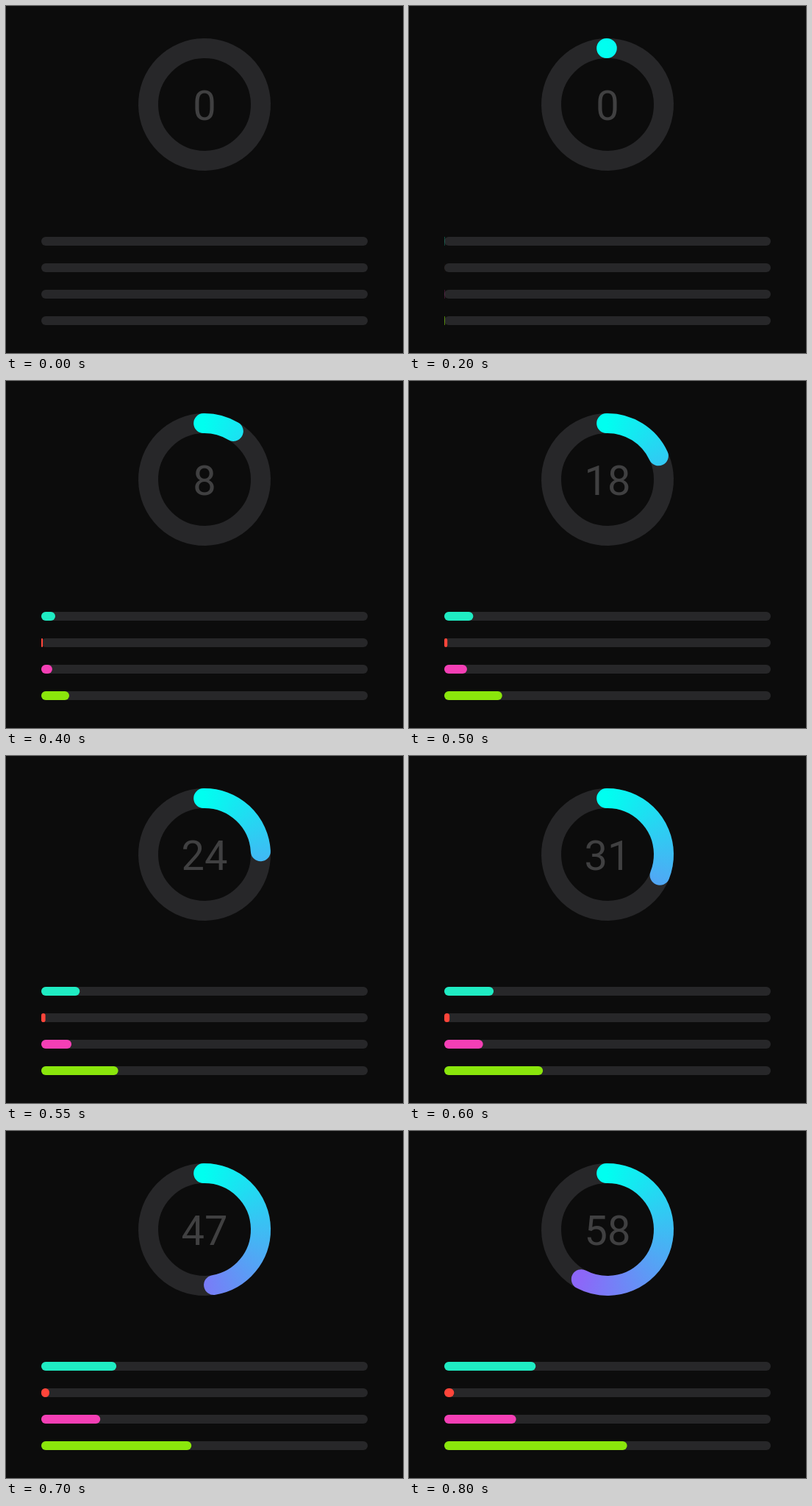
These frames come from a looping animation (540x472 px, 3.8 s). An HTML page with a canvas:

```html
<!DOCTYPE html>
<html lang="en">
<head>
<meta charset="utf-8">
<title>Progress ring and bars</title>
<style>
  html, body { margin: 0; width: 540px; height: 472px; overflow: hidden; background: #0c0c0c; }
  canvas { display: block; }
  #count {
    position: absolute; left: 0; top: 108px; width: 540px;
    font: 400 56px/56px Roboto, sans-serif;
    text-align: center; color: #404041;
  }
</style>
</head>
<body>
<canvas id="stage" width="540" height="472"></canvas>
<div id="count">0</div>
<script>
  const LOOP = 3800, STEP = 50, FIRST = 200;
  const EASE_START = 172.5, EASE_TIME = 582;
  const GOAL = 58;
  const TRACK = '#272729', CYAN = '#00fff0', VIOLET = '#8c67f8';
  const RING = { x: 270, y: 134, r: 76.5, width: 27 };
  const BARS = [
    { y: 314, share: 0.28, color: '#1fecc3' },
    { y: 350, share: 0.03, color: '#ff453a' },
    { y: 386, share: 0.22, color: '#f43fb5' },
    { y: 422, share: 0.56, color: '#8ae60c' }
  ];
  const BAR_X = 48, BAR_W = 444, BAR_H = 12;

  const ctx = document.getElementById('stage').getContext('2d');
  const count = document.getElementById('count');
  const TURN = Math.PI * 2;
  const ringStart = -TURN / 4 - TURN / 360;

  const sweep = ctx.createConicGradient(ringStart, RING.x, RING.y);
  sweep.addColorStop(0, CYAN);
  sweep.addColorStop(GOAL / 100, VIOLET);
  sweep.addColorStop(0.75, VIOLET);
  sweep.addColorStop(0.75, CYAN);
  sweep.addColorStop(1, CYAN);

  function arc(turns, style, cap) {
    ctx.beginPath();
    ctx.arc(RING.x, RING.y, RING.r, ringStart, ringStart + turns * TURN);
    ctx.lineWidth = RING.width;
    ctx.lineCap = cap;
    ctx.strokeStyle = style;
    ctx.stroke();
  }

  function bar(y, width, color) {
    ctx.beginPath();
    ctx.roundRect(BAR_X, y, width, BAR_H, BAR_H / 2);
    ctx.fillStyle = color;
    ctx.fill();
  }

  // Quadratic ease-in, advancing in 50 ms ticks
  function progress(time) {
    if (time < FIRST) return 0;
    const tick = Math.floor(time / STEP) * STEP;
    return Math.min(1, (tick - EASE_START) / EASE_TIME) ** 2;
  }

  function draw(time) {
    const p = progress(time);
    ctx.fillStyle = '#0c0c0c';
    ctx.fillRect(0, 0, 540, 472);
    arc(1, TRACK, 'butt');
    if (p > 0) arc(p * GOAL / 100, sweep, 'round');
    for (const { y, share, color } of BARS) {
      bar(y, BAR_W, TRACK);
      if (p > 0) bar(y, BAR_W * share * p, color);
    }
    count.textContent = Math.floor(p * GOAL);
  }

  const start = performance.now();
  function frame() {
    draw((performance.now() - start) % LOOP);
    requestAnimationFrame(frame);
  }
  frame();
</script>
</body>
</html>
```
